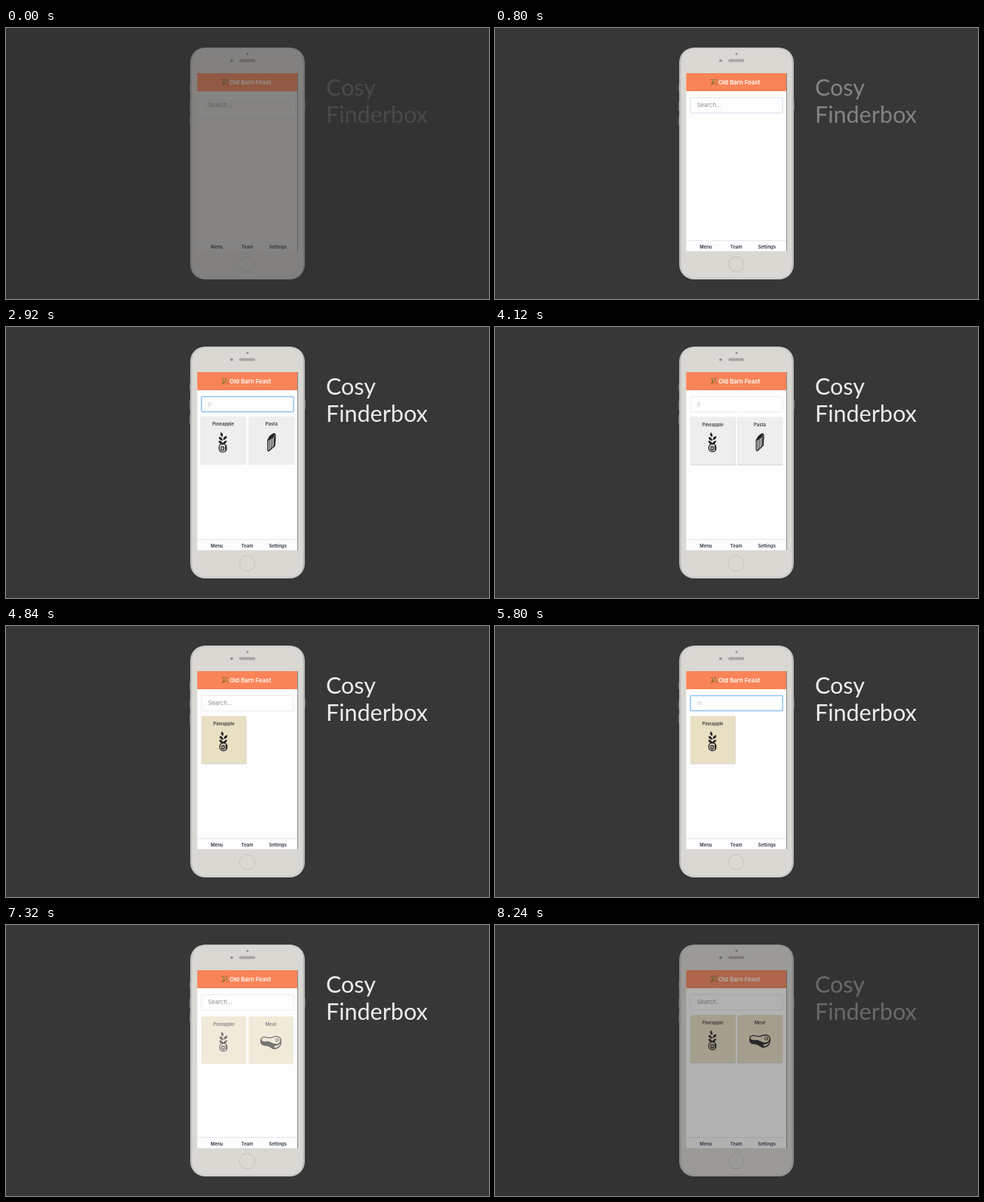
Recreate the animation shown at these times as an HTML page. Size 640x360 px, loop 8280 ms.

```html
<!DOCTYPE html>
<html lang="en">
<head>
<meta charset="utf-8">
<title>Search bar demo</title>
<style>
  html, body { margin: 0; width: 100%; height: 100%; overflow: hidden; background: #373737; }
  svg { display: block; width: 640px; height: 360px; font-family: Inter, "Open Sans", sans-serif; }

  .backdrop, .phone, .title, .screen, .hint, .focus, .typed-p, .typed-meat, .typed-meat tspan, .results {
    animation: 8.28s linear infinite;
  }
  .backdrop { fill: #373737; animation-name: backdrop; }
  .phone { animation-name: phone; }
  .title { animation-name: title; fill: #eee; font-family: Lato, sans-serif; font-size: 30.5px; }
  .screen { animation-name: screen; fill: #fdfdfd; }
  .head { font-size: 7.8px; font-weight: 600; fill: #fff; }
  .nav { font-size: 5.9px; font-weight: 600; fill: #2a3140; text-anchor: middle; }

  .hint { font-size: 7.6px; fill: #8c8c8c; animation-name: hint; }
  .focus { fill: none; stroke: #92c5f5; stroke-width: 1.5; animation-name: focus; }
  .typed-p, .typed-meat { font-size: 7.6px; font-weight: 300; fill: #bbb; animation-timing-function: step-end; }
  .typed-p { animation-name: typed-p; }
  .typed-meat { animation-name: typed-meat; }
  .typed-meat tspan { fill-opacity: 0; animation-name: letter; animation-timing-function: step-end; }
  .typed-meat tspan:nth-child(2) { animation-delay: .12s; }
  .typed-meat tspan:nth-child(3) { animation-delay: .24s; }
  .typed-meat tspan:nth-child(4) { animation-delay: .36s; }

  .results { --bg: #eee; --shade: .14; transform-box: fill-box; transform-origin: center; }
  .picked { --bg: #e9dfc3; }
  .card { fill: var(--bg); }
  .shade { fill: #000; opacity: var(--shade); }
  .label { font-size: 5.9px; font-weight: 600; fill: #3a3a3a; text-anchor: middle; }
  .ink { fill: none; stroke: #222; stroke-linecap: round; stroke-linejoin: round; }
  .found { animation-name: found; }
  .first { animation-name: first; }
  .meat { animation-name: meat; }
  .both { animation-name: both; }

  @keyframes backdrop { 0%, 100% { fill: #333; } 7.25%, 94.69% { fill: #373737; } }
  @keyframes phone { 0% { opacity: .48; } 7.25%, 94.69% { opacity: 1; } 100% { opacity: .59; } }
  @keyframes title { 0% { opacity: .12; } 28.5%, 94.69% { opacity: 1; } 100% { opacity: .22; } }
  @keyframes screen { 0% { fill: #dedcd8; } 7.25%, 100% { fill: #fdfdfd; } }

  @keyframes hint {
    0%, 30.91% { opacity: 1; }
    30.92%, 51.69% { opacity: 0; }
    58.45%, 70.04% { opacity: 1; }
    70.05%, 84.53% { opacity: 0; }
    84.54%, 100% { opacity: 1; }
  }
  @keyframes focus {
    0%, 9.4% { opacity: 0; }
    11.11%, 49.7% { opacity: 1; }
    49.71%, 62.8% { opacity: 0; }
    64.25%, 84.53% { opacity: 1; }
    84.54%, 100% { opacity: 0; }
  }
  @keyframes typed-p { 0%, 51.69% { opacity: 0; } 30.92% { opacity: 1; } }
  @keyframes typed-meat { 0%, 84.54% { opacity: 0; } 70.05% { opacity: 1; } }
  @keyframes letter { 0%, 95% { fill-opacity: 0; } 70.05% { fill-opacity: 1; } }

  @keyframes found {
    0%, 30.92% { opacity: 0; transform: scale(.8); --shade: 0; }
    34.78% { opacity: 1; transform: scale(1.03); --shade: 0; }
    38.65%, 51.69% { opacity: 1; transform: none; --shade: .14; }
    54.11%, 100% { opacity: 0; transform: scale(1.02); --shade: 0; }
  }
  @keyframes first {
    0%, 53.14% { opacity: 0; transform: translateY(4px); --shade: 0; }
    58.45%, 70.05% { opacity: 1; transform: none; --shade: .14; }
    72.46%, 100% { opacity: 0; transform: scale(.9); --shade: 0; }
  }
  @keyframes meat {
    0%, 70.53% { opacity: 0; transform: translateY(58px) scale(.6); --shade: 0; animation-timing-function: ease-out; }
    74.4%, 75.2% { opacity: 1; transform: scale(1.05); --shade: 0; }
    77.78%, 84.54% { opacity: 1; transform: none; --shade: .14; }
    86.5%, 100% { opacity: 0; transform: scale(1.02); --shade: 0; }
  }
  @keyframes both {
    0%, 85.5% { opacity: 0; transform: translateY(4px); --shade: 0; }
    88.41% { opacity: .62; transform: translateY(1.9px); --shade: 0; }
    90.82%, 100% { opacity: 1; transform: none; --shade: .14; }
  }
</style>
</head>
<body>
<svg viewBox="0 0 640 360">
  <defs>
    <linearGradient id="rim" x2="1" y2="0">
      <stop stop-color="#b4b3b3"/>
      <stop offset=".03" stop-color="#cfcecc"/>
      <stop offset=".97" stop-color="#cfcecc"/>
      <stop offset="1" stop-color="#b4b3b3"/>
    </linearGradient>
    <g id="blank">
      <rect class="shade" x="-.3" y=".6" width="60.1" height="63.6" rx="1.5"/>
      <rect class="card" width="59.5" height="63" rx="1.2"/>
    </g>
    <g id="pineapple">
      <use href="#blank"/>
      <text class="label" x="29.5" y="12.3">Pineapple</text>
      <g class="ink" transform="translate(29 34)">
        <path fill="#222" stroke-width=".7" d="M0 2Q-5 2 -5 -2Q-1 -2 0 2Q1 -2 5 -2Q4 2 0 2M-.5 -3Q-5 -3 -4.5 -7Q-1 -7 -.5 -3M1 -4Q1 -8 5 -8Q5 -4 1 -4M-.5 -8Q-4 -9 -2 -13Q1 -11 -.5 -8"/>
        <rect x="-4.6" y="2" width="9.4" height="10" rx="4" stroke-width="1.3"/>
        <path stroke-width="1.3" d="M-2 5.5V9.5H1.2V5.5ZM3.5 4.5V9.5"/>
      </g>
    </g>
    <g id="pasta">
      <use href="#blank"/>
      <text class="label" x="29.5" y="12.3">Pasta</text>
      <g class="ink" transform="translate(29.5 34)">
        <path stroke-width="1.3" d="M-4.8 -3L2.5 -11.5Q5 -12 5 -9L4.2 4L-3.5 11Q-5 11 -4.8 8Z"/>
        <path fill="#222" stroke-width="1" d="M-4.6 -3Q-3 -10 3.5 -11.5Q3.5 -6 -4.6 -3Z"/>
        <path stroke-width="1" d="M-2.6 -3V9.5M-.4 -4.5V7.5M1.8 -6.5V5.5M3.6 -8.5V4"/>
      </g>
    </g>
    <g id="steak">
      <use href="#blank"/>
      <text class="label" x="29.5" y="12.3">Meat</text>
      <g transform="translate(29.5 35)">
        <path fill="#222" d="M-14 -3C-14 -8 -9 -9 -4 -7.5C0 -6.5 3 -9 8 -9C13 -8.5 14.5 -5 14 -1C14 5 9 9 4 8.5C0 8 -2 4 -7 4C-11 4 -14.5 2 -14 -3Z"/>
        <path class="card" d="M-12.4 -4.5C-11.5 -7.6 -8 -7.4 -4 -6.2C0 -5.2 4 -7.8 8 -7.6C12 -7 13 -4.5 12.4 -2.5C11.5 1 8 2 4.5 1.2C1 .3 -1 -2 -6 -1.8C-9.5 -1.6 -12.8 -2 -12.4 -4.5Z"/>
        <path class="card" d="M5 6.6C9 6.4 12 4 12.6 .8C10 3.6 7.5 4 4.5 4.2Z"/>
        <circle class="ink" cx="8.4" cy="-3.6" r="2" stroke-width="1"/>
      </g>
    </g>
  </defs>

  <rect class="backdrop" width="640" height="360"/>

  <g class="title">
    <text x="424" y="90">Cosy</text>
    <text x="424" y="126">Finderbox</text>
  </g>

  <g class="phone">
    <path d="M243.9 75V84M243.9 98V110M243.9 117V129M396.1 97V109" stroke="#8b8b8b"/>
    <rect x="244" y="26" width="152" height="308" rx="20" fill="url(#rim)"/>
    <rect x="246.5" y="28" width="147" height="303.5" rx="18" fill="#dad8d3"/>
    <circle cx="320" cy="34.5" r="1.4" fill="#93918e"/>
    <circle cx="299" cy="43.3" r="1.9" fill="#95938f"/>
    <rect x="309.5" y="41.8" width="20.5" height="3" rx="1.5" fill="#aaa8a4" stroke="#9a9894" stroke-width=".6"/>
    <circle cx="319.7" cy="313.8" r="10.2" fill="#dad8d3" stroke="#c3c1bc"/>

    <path d="M386.3 60V296.5" stroke="#77777a"/>
    <rect class="screen" x="253.3" y="60" width="132.7" height="236.5"/>
    <rect x="253.3" y="60" width="132.7" height="24" fill="#f98458"/>

    <g transform="translate(285 67)">
      <path fill="#a9722c" d="M.5 9.5L3 3.5L6.5 7Z"/>
      <path d="M4 4L3 1M5.5 4.5L8.5 1M6.5 6L9 5.5" fill="none" stroke="#6d8b3c" stroke-width="1.1"/>
      <path d="M.8 1.5h1.3M5.4 .8h1.2M8 8.3h1.3" stroke="#8f4034" stroke-width="1.2"/>
    </g>
    <text class="head" x="296.3" y="74.6">Old Barn Feast</text>

    <rect x="259" y="92.5" width="122" height="20.5" rx="1.5" fill="none" stroke="#ebebec"/>
    <rect class="focus" x="259" y="92.5" width="122" height="20" rx=".8"/>
    <text class="hint" x="267.7" y="104.7">Search...</text>
    <text class="typed-p" x="267.7" y="104.7">p</text>
    <text class="typed-meat" x="267.7" y="104.7"><tspan>m</tspan><tspan>e</tspan><tspan>a</tspan><tspan>t</tspan></text>

    <g class="results found">
      <use href="#pineapple" x="259" y="119.5"/>
      <use href="#pasta" x="321.5" y="119.5"/>
    </g>
    <g class="results picked first"><use href="#pineapple" x="259" y="119.5"/></g>
    <g class="results meat"><use href="#steak" x="259" y="119.5"/></g>
    <g class="results picked both">
      <use href="#pineapple" x="259" y="119.5"/>
      <use href="#steak" x="321.5" y="119.5"/>
    </g>

    <path d="M253.3 282.3H386" stroke="#e4e5ea"/>
    <g class="nav">
      <text x="279.3" y="293">Menu</text>
      <text x="319.7" y="293">Team</text>
      <text x="360.2" y="293">Settings</text>
    </g>
  </g>
</svg>
</body>
</html>
```
